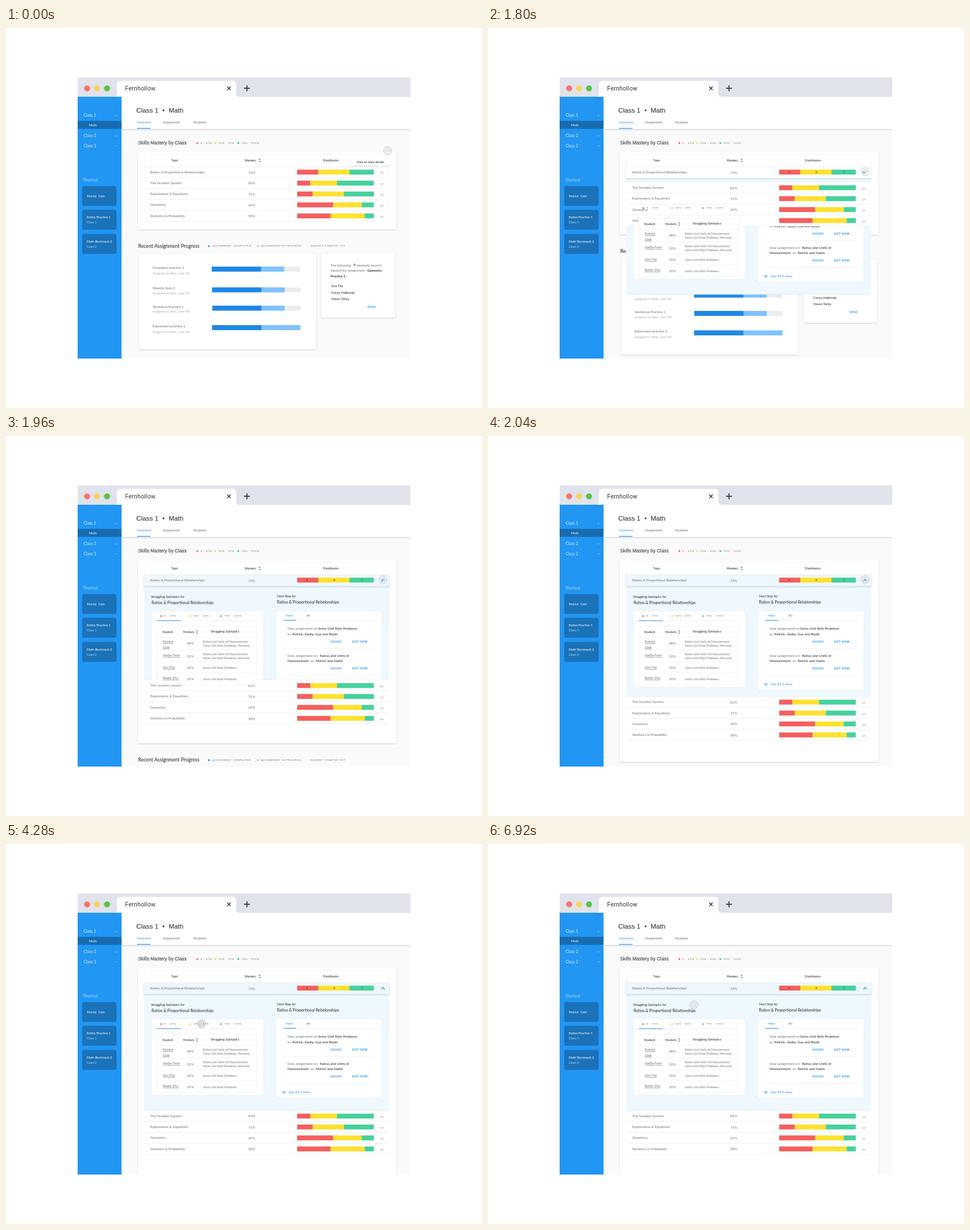
An HTML page that plays this animation: 837x669 px, repeating every 6960 ms.

```html
<!DOCTYPE html>
<html lang="en">
<head>
<meta charset="utf-8">
<title>Class dashboard</title>
<style>
html, body { margin: 0; width: 100%; height: 100%; overflow: hidden; background: #fff; }
svg { display: block; }
text { font-family: Lato, sans-serif; white-space: pre; }
.sans { font-family: "Liberation Sans", Arial, sans-serif; }
.tab { font-family: Roboto, sans-serif; letter-spacing: .3px; }
.key { letter-spacing: .9px; }
.act { letter-spacing: .4px; font-weight: 700; }
.bold { font-weight: 700; }
.link { text-decoration: underline; }
.card { fill: #fff; filter: drop-shadow(0 1px 1px rgba(0,0,0,.17)); }
.soft { fill: #fff; filter: drop-shadow(0 0 1px rgba(0,0,0,.06)); }
</style>
</head>
<body>
<svg id="stage" width="837" height="669" viewBox="0 0 837 669"></svg>
<script>
const BLUE = '#2196f3', DARK = '#333', GREY = '#6b6b6b', PALE = '#ededed';
const RED = '#f55f5e', YELLOW = '#ffe12f', GREEN = '#46d19c';

// y is the middle of the capital letters
const text = (x, y, s, size = 6.2, fill = GREY, cls = '') =>
  `<text x="${x}" y="${y + size * .36}" font-size="${size}" fill="${fill}" class="${cls}">${s}</text>`;
const rect = (x, y, w, h, fill, extra = '') =>
  `<rect x="${x}" y="${y}" width="${w}" height="${h}" fill="${fill}" ${extra}/>`;
const card = (x, y, w, h, cls = 'card') =>
  `<rect x="${x}" y="${y}" width="${w}" height="${h}" rx="1.5" class="${cls}"/>`;
const dot = (x, y, r, fill) => `<circle cx="${x}" cy="${y}" r="${r}" fill="${fill}"/>`;
const line = (d, stroke, width = 1) =>
  `<path d="${d}" fill="none" stroke="${stroke}" stroke-width="${width}"/>`;
const rule = (x1, x2, y, stroke = PALE, width = .8) => line(`M${x1} ${y}H${x2}`, stroke, width);
const chevron = (x, y, r, stroke, width, up = 1) =>
  line(`M${x - r} ${y - up * r / 2}l${r} ${up * r}l${r} ${-up * r}`, stroke, width);
const group = (id, body) => `<g id="${id}">${body}</g>`;
const bar = (y, h, stops, fills) =>
  fills.map((f, i) => rect(stops[i], y - h / 2, stops[i + 1] - stops[i], h, f)).join('');
const levels = (y, a, b) => bar(y, 8.6, [512, a, b, 646.7], [RED, YELLOW, GREEN]);
const sorter = (x, y) =>
  `<path d="M${x - 2} ${y - 1}l2 -2.4l2 2.4zM${x - 2} ${y + 1}l2 2.4l2 -2.4z" fill="#888"/>`;
const keys = (y, dots, labels, names) => names.map((n, i) =>
  dot(dots[i], y, 1.6, [RED, '#fdd835', '#35c993'][i]) + text(labels[i], y, n, 4.1, '#666', 'key')).join('');
const RANGES = ['0 - 49%', '50% - 69%', '70% - 100%'];

function chrome() {
  const item = (y, label, up) => text(136.5, y, label, 7.1, '#e6f3ff') + chevron(194, y + .5, 1.6, '#cfe7fd', .7, up);
  const shortcut = (y, a, b) => rect(134, y, 60.3, 35, '#1a72b9', 'rx="3"') +
    (b ? text(142, y + 13, a, 5.7, '#fff') + text(142, y + 22, b, 5.7, '#b9dbf8') : text(142.3, y + 17.5, a, 5.7, '#fff'));
  return rect(126, 87, 585, 34, '#e0e3eb') +
    '<path d="M189 121q6 0 6-6v-16q0-6 6-6h198q6 0 6 6v16q0 6 6 6z" fill="#fff"/>' +
    dot(142.7, 106.2, 5.3, '#fc736d') + dot(160.2, 106.2, 5.3, '#f8d25a') + dot(177.7, 106.2, 5.3, '#5cc24c') +
    text(209.5, 106.2, 'Fernhollow', 10.3, '#333', 'tab') +
    line('M389 103l6 6.4m0-6.4l-6 6.4', '#222', 1.3) + line('M418.5 106.2h10.4m-5.2-5.2v10.4', '#333', 1.7) +
    rect(203, 121, 508, 57, '#fff', 'style="filter:drop-shadow(0 1px 1px rgba(0,0,0,.2))"') +
    text(229, 144.8, 'Class 1', 11.7, '#222', 'sans') + dot(277, 145, 1.5, '#222') + text(286, 144.8, 'Math', 11.7, '#222', 'sans') +
    text(230, 166.3, 'Overview', 5.9, BLUE) + text(276, 166.3, 'Assignment', 5.9) + text(329, 166.3, 'Students', 5.9) +
    rule(230, 254, 176.6, BLUE, 1.2) +
    rect(126, 121, 77, 461, BLUE) + rect(203, 121, 1.2, 461, '#cfe7fb') +
    rect(126, 163.5, 77, 14, '#186cb0') + text(146, 171, 'Math', 5.8, '#fff') +
    item(153.8, 'Class 1', -1) + item(189.5, 'Class 2', 1) + item(207, 'Class 3', 1) +
    text(136, 267.8, 'Shortcut', 6.9, '#b5dbfb') +
    shortcut(278.3, 'Patrick  Cole') + shortcut(320, 'Ratios Practice 1', 'Class 1') + shortcut(362.5, 'Math Bechmark 3', 'Class 2');
}

function recent() {
  const task = (name, y, y2, by, stops) => text(257.7, y, name) +
    text(257.7, y2, 'Assigned on Wed., June 9th', 5.4, '#aaa') +
    bar(by, 8.8, stops, ['#1e88e5', '#7fc2fd', '#ececec']);
  return text(232.5, 383.5, 'Recent Assignment Progress', 8.7, '#222') +
    dot(357, 384, 1.6, '#1e88e5') + text(363, 384, 'ASSIGNMENT COMPLETED', 4, '#666', 'key') +
    dot(442.8, 384, 1.6, '#7fc2fd') + text(448.5, 384, 'ASSIGNMENT IN PROGRESS', 4, '#666', 'key') +
    dot(532, 384, 1.4, '#e8e8e8') + text(536.3, 384, "HAVEN'T STARTED YET", 4, '#666', 'key') +
    card(234, 398, 311.5, 168) + card(555, 398, 129, 112) +
    task('Geometry practice 2', 422, 432, 424.5, [361.8, 448.8, 489, 517]) +
    task('Weekly Quiz 2', 458, 467.5, 461, [362.3, 449.5, 490, 518]) +
    task('Statistical Practice 1', 490.5, 499.5, 493.2, [362.7, 449.7, 490, 518]) +
    task('Expression practice 2', 524.3, 535, 527.5, [362.3, 449.5, 517.6, 517.6]) +
    text(570.8, 417.5, 'The following', 6) + text(611, 417.3, '3', 6, DARK, 'bold') + text(617, 417.5, "students haven't", 6) +
    text(570.8, 426.5, 'started the assignment', 6) + text(635, 426.5, 'Geometry', 5.8, DARK, 'bold') +
    text(570.8, 436.5, 'Practice 2 :', 5.8, DARK, 'bold') +
    ['Gus Fay', 'Corey Halbrook', 'Owen Tarby'].map((n, i) => text(572, 454 + i * 11.4, n, 6, '#222')).join('') +
    text(635.5, 491, 'SEND', 5, BLUE, 'act');
}

function tableHead() {
  return line('M243.3 340V223H673V340', '#f1f1f1', .8) + rule(243, 673, 244.5) +
    text(290.5, 232.8, 'Topic', 5.4, '#222', 'sans') + text(420, 232.8, 'Mastery', 5.5, '#222', 'sans') +
    sorter(446, 233) + text(557.5, 232.8, 'Distribution', 5.55, '#222', 'sans');
}

function rows() {
  const row = (name, pct, y, a, b) => text(253.7, y - .3, name) + text(426, y + .2, pct) +
    levels(y, a, b) + chevron(660.8, y + 1.5, 3, '#888', .9) + rule(243, 673, y + 9.5);
  return rect(243, 263, 430, 77.5, '#fff') + rule(243, 673, 263) +
    row('The Number System', '82%', 273, 535.3, 582) + row('Expressions &amp; Equations', '71%', 292.2, 539.5, 594) +
    row('Geometry', '69%', 311.4, 575, 625.5) + row('Statistics &amp; Probability', '58%', 330.8, 570.8, 630.8);
}

function panel() {
  const buttons = y => text(570, y, 'ASSIGN', 5, BLUE, 'act') + text(608.5, y, 'NOT NOW', 5, BLUE, 'act');
  const title = 'Ratios &amp; Proportional Relationships';
  return rect(243, 245, 430, 224, '#eef8fe') + rule(243, 673, 469, '#d3e6ef') +
    text(255, 282.5, 'Struggling Subtopics for', 5.64, '#222') + text(256, 293.5, title, 7.05, '#222') +
    text(476.5, 282.3, 'Next Step for', 5.64, '#222') + text(476.5, 292.5, title, 7.05, '#222') +
    card(256, 308, 196.5, 134, 'soft') + card(475, 308, 185.5, 139, 'soft') +
    rule(265, 440, 325.2) + `<g id="mark">${rule(265, 307, 325, BLUE, 1.1)}</g>` +
    rule(488, 653, 324.7) + rule(488, 510, 324.5, BLUE, 1.1) + text(492, 315.8, 'New', 6.1, BLUE) + text(528, 315.8, 'All', 6.1) +
    text(495, 339, 'Give assignment on') + text(549, 339, 'Solve Unit Rate Problems', 6.2, '#222') +
    text(495, 348.5, 'to') + text(503.5, 348.5, 'Patrick, Nadia, Gus and Bodin', 6.2, '#222') + buttons(361.8) +
    rule(495, 648, 374) +
    text(495, 386.5, 'Give assignment on') + text(552, 386.5, 'Ratios and Units of', 6.2, '#222') +
    text(495, 395.5, 'Measurement', 6.2, '#222') + text(536, 395.5, 'to') + text(544.5, 395.5, 'Patrick and Nadia', 6.2, '#222') + buttons(409.5) +
    rule(495, 648, 421.5) + chevron(488.7, 437, 2.7, BLUE, 1.3) + text(497, 436.8, 'See All 5 New', 6.25, BLUE);
}

function students() {
  const links = (list) => list.map(([y, n]) => text(275.7, y, n, 6.1, GREY, 'link')).join('');
  const marks = (list) => list.map((p, i) => text(318, [365.2, 387.5, 407.8, 428][i], p)).join('');
  const notes = (list) => list.map(([y, s]) => text(346.3, y, s, 5.35, '#777')).join('');
  const rate = 'Solve Unit Rate Problems', units = 'Ratios and Units of Measurement,', more = 'Solve Unit Rate Problems, Percents';
  return rect(265, 334.5, 176, 103.5, '#fff', 'stroke="#f1f1f1" stroke-width=".8"') +
    [354, 376.5, 398, 417].map(y => rule(265, 441, y, '#f1f1f1')).join('') +
    keys(317, [273, 323.7, 377.8], [279, 329.5, 383.5], RANGES) +
    text(274.8, 344.8, 'Student', 5.6, '#222') + text(311.5, 344.8, 'Mastery', 5.6, '#222') + sorter(336, 345) +
    text(360, 344.3, 'Struggling Subtopics', 5.63, '#222') +
    group('low', links([[362, 'Patrick'], [371.5, 'Cole'], [386.3, 'Nadia Fenn'], [407, 'Gus Fay'], [426, 'Bodin Zhu']]) +
      marks(['48%', '52%', '56%', '59%']) +
      notes([[362, units], [368.8, more], [383.8, units], [390.8, more], [407.6, rate], [427.6, rate]])) +
    group('mid', links([[364.8, 'Ruth'], [386.3, 'Colin'], [407, 'Wanda'], [426, 'Corey']]) +
      marks(['58%', '60%', '61%', '65%']) +
      notes([[366.3, 'Percents'], [383.8, 'Ratios and Ratio Language, Ratios and'], [390.8, 'Units of Measurement'],
        [407.6, 'Ratios and Ratio Language'], [427.6, rate]]));
}

function firstRow() {
  return group('lift', `<rect id="liftBox" x="242" y="244.5" width="432.5" height="20" style="filter:drop-shadow(0 1px 1.2px rgba(70,120,160,.35))"/>`) +
    text(253.7, 254.2, 'Ratios &amp; Proportional Relationships') + text(426, 255.2, '73%') + levels(253.7, 549, 604) +
    group('counts', [[527.4, 4], [575.4, 9], [624, 7]].map(([x, n]) => text(x, 254, n, 6.1, '#333')).join('')) +
    group('greyArrow', chevron(660.8, 254.3, 3, '#888', .9)) + group('arrow', chevron(0, 0, 3, BLUE, 1.3));
}

const tooltip = () => card(606, 230, 70, 12.3) + '<path d="M653.5 242h7l-3.5 3z" fill="#fff"/>' +
  text(616.5, 236.2, 'Click to view details', 5.57, '#222');

document.getElementById('stage').innerHTML =
  `<svg x="126" y="87" width="585" height="495" viewBox="126 87 585 495">` +
  rect(126, 87, 585, 495, '#fafafa') +
  group('box', card(232, 218, 454.5, 136.5)) + group('recent', recent()) +
  text(232.3, 201.8, 'Skills Mastery by Class', 8.3, '#222', 'sans') +
  keys(202.5, [336.5, 368, 408.5], [342.5, 374, 414.3], RANGES) +
  tableHead() + group('panel', panel()) + group('rows', rows()) + group('students', students()) +
  firstRow() + group('tip', tooltip()) + chrome() +
  '<circle id="cursor" r="7.5" fill="#bbb" stroke="#999" stroke-opacity=".35" stroke-width=".8"/></svg>';

const el = id => document.getElementById(id);
const ramp = (t, a, b) => Math.min(1, Math.max(0, (t - a) / (b - a)));
const smooth = u => u < .5 ? 4 * u ** 3 : 1 - 4 * (1 - u) ** 3;
const mix = (a, b, p) => a + (b - a) * p;

// cubic-bezier(.31, 0, .2, 1)
function settle(u) {
  let lo = 0, hi = 1, s;
  for (let i = 0; i < 24; i++) {
    s = (lo + hi) / 2;
    const x = 3 * (1 - s) ** 2 * s * .31 + 3 * (1 - s) * s * s * .2 + s ** 3;
    if (x < u) lo = s; else hi = s;
  }
  return u <= 0 ? 0 : u >= 1 ? 1 : s * s * (3 - 2 * s);
}

// start, end, x, y
const moves = [[0, 1040, 663, 253], [3120, 3680, 344, 316.6], [4700, 5520, 289, 319], [6840, 6920, 362, 283]];

function draw(t) {
  const fade = (id, o) => el(id).setAttribute('opacity', o);
  const move = (id, x, y, more = '') => el(id).setAttribute('transform', `translate(${x} ${y})${more}`);
  const open = settle(ramp(t, 1763, 2148));
  const shown = ramp(t, 1720, 1800);
  const hover = ramp(t, 720, 1040);
  const early = ramp(t, 360, 720);
  const second = smooth(ramp(t, 4440, 4880)) - smooth(ramp(t, 6040, 6520));

  move('rows', 0, 206 * open);
  move('recent', 0, 231 * open);
  el('box').firstChild.setAttribute('height', 136.5 + 231 * open);
  fade('panel', shown);
  fade('students', shown);

  fade('tip', 1 - early);
  fade('counts', early);
  fade('lift', hover);
  const tint = ramp(open, 0, .9);
  el('liftBox').setAttribute('fill', `rgb(${mix(255, 238, tint)},${mix(255, 247, tint)},${mix(255, 254, tint)})`);
  fade('greyArrow', 1 - hover);
  fade('arrow', hover);
  move('arrow', mix(661, 662.8, open), 254, `rotate(${180 * open})`);

  move('mark', 56 * second, 0);
  fade('low', 1 - second);
  fade('mid', second);

  let x = 671, y = 216;
  for (const [a, b, nx, ny] of moves) {
    const p = smooth(ramp(t, a, b));
    x = mix(x, nx, p);
    y = mix(y, ny, p);
  }
  move('cursor', x, y);
  const press = t >= 4280 ? 1 - ramp(t, 4480, 4720) : 0;
  el('cursor').setAttribute('fill-opacity', mix(.25, .5, press));
}

const start = performance.now();
function tick() {
  const t = (performance.now() - start) % 6960;
  draw(Math.floor(t / 40) * 40);
  requestAnimationFrame(tick);
}
tick();
</script>
</body>
</html>
```
